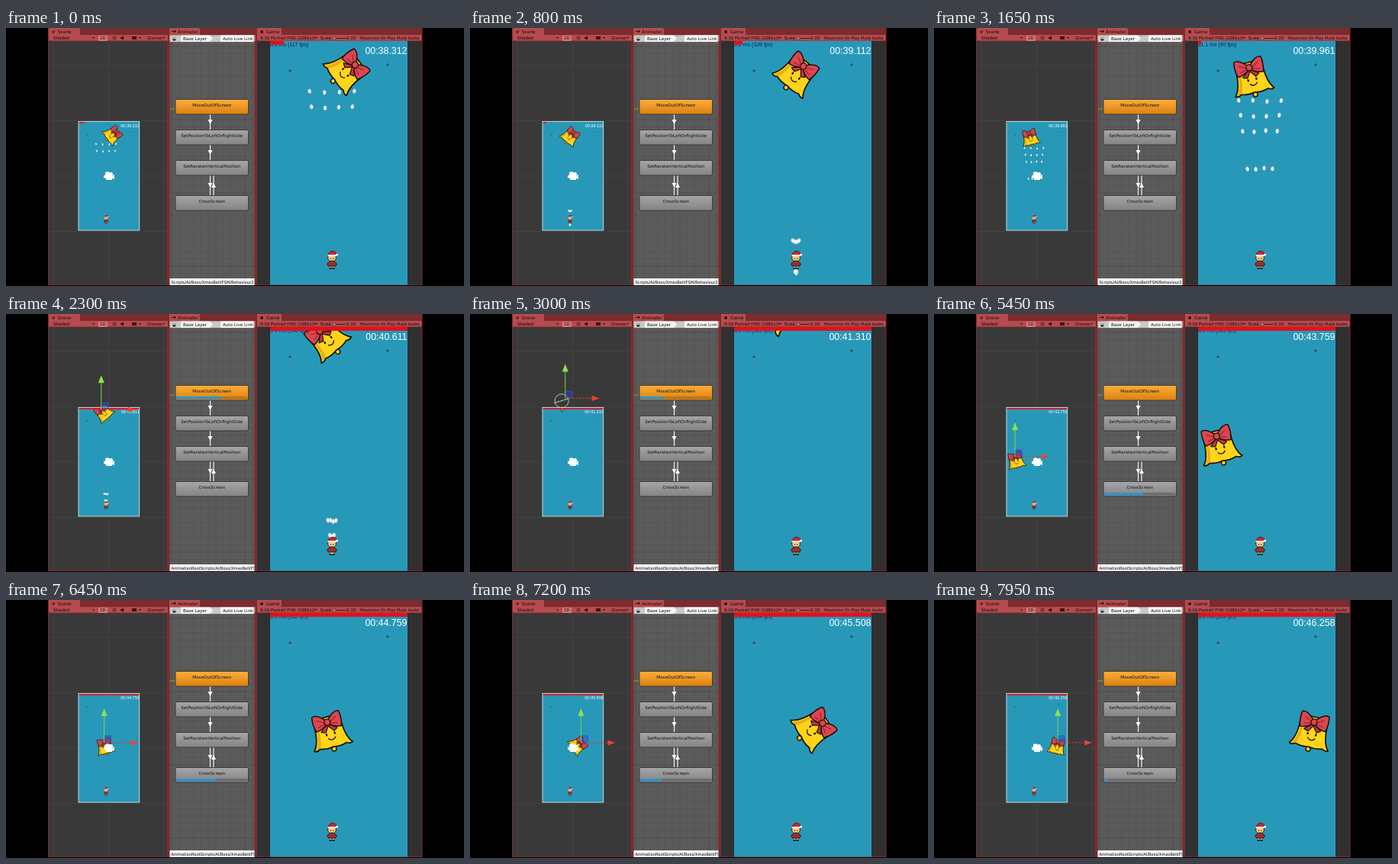
These frames come from a looping animation (600x338 px, 8 s). An HTML page with a canvas:

```html
<!DOCTYPE html>
<html lang="en">
<head>
<meta charset="utf-8">
<title>Bell boss in the editor</title>
<style>
  html, body { margin: 0; width: 100%; height: 100%; overflow: hidden; background: #000; }
  canvas { display: block; width: 600px; height: 338px; }
</style>
</head>
<body>
<canvas></canvas>
<script>
const LOOP = 8000, TAU = Math.PI * 2;
const SELECT = 2100, MOVE_OUT = 1670, CROSS = 3900;
const UI = '"DejaVu Sans", sans-serif', GAME = '"Liberation Sans", sans-serif';
const canvas = document.querySelector('canvas');
const ctx = canvas.getContext('2d');
const ratio = window.devicePixelRatio || 1;
canvas.width = 600 * ratio;
canvas.height = 338 * ratio;

// ---------- helpers ----------
function rect(x, y, w, h, color) {
  ctx.fillStyle = color;
  ctx.fillRect(x, y, w, h);
}
function text(str, x, y, size, color = '#160808', align = 'left', font = UI) {
  ctx.font = size + 'px ' + font;
  ctx.textAlign = align;
  ctx.textBaseline = 'alphabetic';
  ctx.fillStyle = color;
  ctx.fillText(str, x, y);
}
function line(x1, y1, x2, y2, color, width = 1) {
  ctx.strokeStyle = color;
  ctx.lineWidth = width;
  ctx.beginPath();
  ctx.moveTo(x1, y1);
  ctx.lineTo(x2, y2);
  ctx.stroke();
}
function shape(d, fill, stroke, width = 1.5) {
  const path = new Path2D(d);
  if (fill) { ctx.fillStyle = fill; ctx.fill(path); }
  if (stroke) { ctx.strokeStyle = stroke; ctx.lineWidth = width; ctx.stroke(path); }
}
function oval(x, y, rx, ry, fill, stroke, width = 1, tilt = 0) {
  ctx.beginPath();
  ctx.ellipse(x, y, rx, ry, tilt, 0, TAU);
  if (fill) { ctx.fillStyle = fill; ctx.fill(); }
  if (stroke) { ctx.strokeStyle = stroke; ctx.lineWidth = width; ctx.stroke(); }
}
function clipped(x, y, w, h, draw) {
  ctx.save();
  ctx.beginPath();
  ctx.rect(x, y, w, h);
  ctx.clip();
  draw();
  ctx.restore();
}
const dropdown = (x, y) => shape(`M${x} ${y}h3l-1.5 2z`, '#2a0c0c');

// ---------- state at a time ----------
function clipPhase(t) {
  return (((t - (t < CROSS ? MOVE_OUT : CROSS)) / 1000) % 1 + 1) % 1;
}
// Positions are relative to the 180 x 319 game screen.
function bellPose(t) {
  const angle = (60 * Math.sin(TAU * clipPhase(t) - 0.09) - 1) * Math.PI / 180;
  if (t < MOVE_OUT) {
    const k = t / MOVE_OUT;
    return { x: 109 - 42 * k, y: 33 + 5 * k, angle };
  }
  if (t < CROSS) return { x: 67, y: 38 - 0.0482 * (t - MOVE_OUT), angle };
  return { x: 25 + 0.0505 * (t - 5450), y: 146, angle };
}
const clock = t => '00:' + (38.311 + t * 0.9995 / 1000).toFixed(3);
const health = t => t < MOVE_OUT + 40 ? Math.max(0, 18 - 14 * t / 1650) : 180;

// ---------- game world ----------
function drawBell({ x, y, angle }) {
  const ink = '#17100a', red = '#dc4650';
  ctx.save();
  ctx.translate(x, y);
  ctx.rotate(angle);
  ctx.lineJoin = 'round';
  oval(0, 33, 3, 3, '#ffd41a', ink, 1.4);
  shape('M-26 30Q-18 21-18-1Q-17-10 0-10Q17-10 18-1Q18 21 26 30Q22 32 18 29Q9 32 0 30Q-9 32-18 29Q-22 32-26 30Z', '#ffd41a', ink, 1.7);
  shape('M-23 29Q-16 20-16 2L-13 2Q-13 20-17 28Z', '#e9ae10');
  oval(-5, 13, 1.2, 1.8, ink);
  oval(6, 13, 1.2, 1.8, ink);
  shape('M-4 18Q1 24 6 18', null, ink, 1.3);
  shape('M-2 0L-11 8L-5 10L0 2L6 10L11 7L2 0Z', '#c9343f', ink, 1.2);
  shape('M0-4Q-11-17-18-14Q-20-4-17 6Q-9 6 0-1Q9 6 17 6Q20-4 18-14Q11-17 0-4Z', red, ink, 1.5);
  shape('M-4-3L-13-8M-4-1L-13 1M4-3L13-8M4-1L13 1', null, '#8f1f2b', 1);
  oval(0, -3, 4, 4.2, red, ink, 1.3);
  ctx.restore();
}
function drawPlayer() {
  ctx.save();
  ctx.translate(81, 287);
  rect(-3, 7, 2, 4, '#e8b98a');
  rect(1, 7, 2, 4, '#e8b98a');
  rect(-3.5, 10, 3, 2, '#1a1210');
  rect(0.5, 10, 3, 2, '#1a1210');
  oval(0, -3, 5.5, 5, '#f3c23c', '#3a200c', 1);
  oval(0, -2, 3.6, 3.6, '#f8d4a8');
  oval(-1.6, -2, 0.6, 0.9, '#20140c');
  oval(1.6, -2, 0.6, 0.9, '#20140c');
  shape('M-2 1L-6.5 5L-4.5 8H4.5L6.5 5L2 1Z', '#c21f2a', '#2a1010', 1);
  rect(-4, 4, 8, 1.4, '#1f6b34');
  shape('M-5.5-6Q-3-13 3-11.5L7-8L5-5.5Z', '#d8202c', '#3a1010', 0.8);
  rect(-5.5, -7, 11, 2, '#fff');
  oval(6.5, -7, 1.6, 1.6, '#fff');
  ctx.restore();
}
// Rows of four shots narrow towards the player.
const SHOTS = [-95, -20, 55, 1257, 1439, 1513, 1587];
function drawShots(t) {
  for (const start of SHOTS) {
    const y = 61 + 0.27 * (t - start);
    if (t < start || y > 319) continue;
    const spread = 18.6 * (295 - y) / 217;
    for (let i = 0; i < 4; i++) {
      const side = i - 1.5;
      oval(81 + side * spread, y + Math.sin(i * 2 + start), 1.9, 2.8, '#fff', '#cfd5d8', 0.7, side * 0.12);
    }
  }
}
const FPS = [117, 109, 98, 90, 106, 113, 113, 113, 112, 113, 113, 112, 113, 104, 116];
function drawWorld(t, showStats) {
  clipped(0, 0, 180, 319.5, () => {
    rect(0, 0, 180, 320, '#2898b9');
    oval(26, 39, 1.8, 1.6, '#34504a');
    oval(154, 31, 1.8, 1.6, '#34504a');
    drawShots(t);
    drawBell(bellPose(t));
    drawPlayer();
    if (showStats) {
      const fps = FPS[Math.floor(t / 550)];
      text(`${(1000 / fps).toFixed(1)} ms (${fps} fps)`, 0, 6.5, 7, '#10205c', 'left', GAME);
    }
    rect(0, 0, health(t), 5, '#e5101c');
    text(clock(t), 179.5, 17, 12.4, '#fff', 'right', GAME);
  });
}

// ---------- editor panels ----------
function drawPanel(x, w, title, tabWidth, titleX) {
  rect(x, 0, w, 337, '#7c2b2e');
  rect(x + 1, 0, tabWidth, 9, '#b54b4e');
  rect(x + 1, 9, w - 2, 8, '#b54b4e');
  line(x, 17, x + w, 17, '#6b2023', 0.6);
  text(title, titleX, 7.2, 5.8);
}
function drawGizmo(t) {
  const { x, y } = bellPose(t);
  const gx = 95 + x * 0.4444, gy = 122 + y * 0.4444;
  line(gx, gy, gx, gy - 37, '#7fd84a');
  shape(`M${gx - 4} ${gy - 35}L${gx} ${gy - 45}L${gx + 4} ${gy - 35}Z`, '#8ee052');
  ctx.setLineDash([3, 1.5]);
  line(gx, gy, gx + 36, gy, '#e0382c');
  ctx.setLineDash([]);
  shape(`M${gx + 35} ${gy - 3.5}L${gx + 45} ${gy}L${gx + 35} ${gy + 3.5}Z`, '#ea4434');
  shape(`M${gx + 1} ${gy - 9}h8v8h-8z`, 'rgba(40,70,190,.4)', '#3454c8', 1);
}
function drawCollider(t) {
  const { x, y, angle } = bellPose(t);
  const cx = 95 + (x - 13 * Math.sin(angle)) * 0.4444;
  const cy = 122 + (y + 13 * Math.cos(angle)) * 0.4444;
  oval(cx, cy, 9, 9, null, '#b9c4b9', 1);
  line(cx - 10, cy + 3, cx + 9, cy - 3, '#a6e6a0', 1);
}
function drawScene(t) {
  drawPanel(55, 158, 'Scene', 41, 68);
  text('#', 60, 7, 5.5);
  text('Shaded', 62, 15, 5.6);
  dropdown(113, 12);
  rect(121, 10, 12, 7, '#d47779');
  text('2D', 123, 15.2, 5.4);
  oval(142, 13, 1.8, 1.8, null, '#2a0c0c', 0.8);
  shape('M150 12h2l2-2v6l-2-2h-2z', '#2a0c0c');
  rect(165, 11, 6, 4, '#3a1214');
  dropdown(174, 12);
  text('Gizmos', 185, 15, 5.4);
  dropdown(205, 12);

  clipped(56, 17.5, 154.5, 318.5, () => {
    rect(56, 17, 156, 320, '#393939');
    for (let i = -2; i <= 2; i++) {
      line(135 + 72.5 * i, 17, 135 + 72.5 * i, 337, '#454545', 0.8);
      line(56, 194 + 72.5 * i, 212, 194 + 72.5 * i, '#454545', 0.8);
    }
    if (t >= SELECT) drawCollider(t);
    ctx.save();
    ctx.translate(95, 122.5);
    ctx.scale(0.4444, 0.4444 * 1.005);
    drawWorld(t, false);
    ctx.restore();
    ctx.strokeStyle = '#d8dcdc';
    ctx.lineWidth = 0.9;
    ctx.strokeRect(95, 122.5, 79.7, 142.5);
    // camera icon
    oval(133, 191.5, 3.2, 3.2, '#fff');
    oval(137.5, 191.5, 2.6, 2.6, '#fff');
    shape('M131 192h8v2l3-2v6l-3-1v2h-8v-2l-3-1v-3l3 0z', '#fff');
    if (t >= SELECT) drawGizmo(t);
  });
}
function drawNode(name, y, orange, phase) {
  const fill = ctx.createLinearGradient(0, y, 0, y + 19);
  fill.addColorStop(0, orange ? '#f9ae3c' : '#a6a6a6');
  fill.addColorStop(1, orange ? '#dc8210' : '#848484');
  ctx.beginPath();
  ctx.roundRect(222, y, 95.5, 19.5, 2);
  ctx.fillStyle = fill;
  ctx.fill();
  ctx.strokeStyle = '#2c2c2c';
  ctx.lineWidth = 0.8;
  ctx.stroke();
  text(name, 269.7, y + 9, 5.6, '#111', 'center');
  if (phase !== null) {
    rect(223, y + 14.5, 93, 3.5, orange ? '#b87622' : '#6e6e6e');
    rect(223, y + 14.5, 93 * phase, 3.5, '#3293c8');
  }
}
function drawLink(x, y1, y2, tip) {
  const mid = (y1 + y2) / 2;
  line(x, y1, x, y2, '#f4f4f4', 1.2);
  shape(`M${x - 3} ${mid - 3 * tip}h6l-3 ${6 * tip}z`, '#fff');
}
function drawAnimator(t) {
  drawPanel(213, 115, 'Animator', 40, 225);
  shape('M217 4h4l-1-2l3 2.5l-3 2.5l1-2h-4z', '#2a0c0c');
  rect(214.5, 9.5, 111, 9, '#c9c9c9');
  rect(229, 9.5, 38, 8.5, '#f4f4f4');
  rect(281, 9.5, 43, 8.5, '#fafafa');
  text('◒', 218, 16, 5.5);
  text('Base Layer', 232, 15.6, 5.6, '#111');
  shape('M267 9.5l4 4.2l-4 4.3z', '#f4f4f4');
  text('Auto Live Link', 284, 15.6, 5.6, '#111');

  clipped(214.5, 18.5, 111, 318.5, () => {
    rect(214, 18, 113, 320, '#5b5b5b');
    for (let i = 0; i < 34; i++) {
      const tone = i % 10 ? '#535353' : '#484848';
      if (i < 12) line(217 + 9.6 * i, 18, 217 + 9.6 * i, 337, tone, 0.7);
      line(214, 24 + 9.6 * i, 327, 24 + 9.6 * i, tone, 0.7);
    }
    line(214, 106, 222, 106, '#b5832a', 1.2);
    drawLink(267.5, 113, 133, 1);
    drawLink(267.5, 153, 173, 1);
    drawLink(267.5, 193, 219, 1);
    drawLink(272, 193, 219, -1);
    const phase = t >= SELECT ? clipPhase(t) : null;
    drawNode('MoveOutOfScreen', 93.5, true, t < CROSS ? phase : null);
    drawNode('SetPositionToLeftOrRightSide', 133.5, false, null);
    drawNode('SetRandomVerticalPosition', 173.5, false, null);
    drawNode('CrossScreen', 219.5, false, t >= CROSS ? phase : null);
    rect(214, 328, 113, 9, '#f1f1f1');
    const path = 'Scripts/AI/Boss/XmasBell/FSM/Behaviour2';
    text(t < SELECT ? path : 'AnimationRoot' + path, 216.5, 334.6, 5.2, '#111');
  });
}
function drawGame(t) {
  drawPanel(328, 217.5, 'Game', 32, 341);
  oval(335, 5, 2, 2, '#2a0c0c');
  text('9:16 Portrait FHD (1080x1!', 333, 15, 5.4);
  dropdown(405, 12);
  text('Scale', 411.5, 15, 5.4);
  line(428, 13.5, 445, 13.5, '#4a1518', 1);
  oval(430, 13.5, 2, 2, '#d08688', '#4a1518', 0.6);
  text('0.33:', 446, 15, 5.4);
  text('Maximize On Play', 464, 15, 5.2);
  text('Mute Audio', 512, 15, 5.2);
  rect(329, 17, 215.5, 319, '#303030');
  ctx.save();
  ctx.translate(346, 17);
  drawWorld(t, true);
  ctx.restore();
}

function frame() {
  const t = performance.now() % LOOP;
  ctx.setTransform(ratio, 0, 0, ratio, 0, 0);
  rect(0, 0, 600, 338, '#000');
  drawScene(t);
  drawAnimator(t);
  drawGame(t);
  requestAnimationFrame(frame);
}
frame();
</script>
</body>
</html>
```
